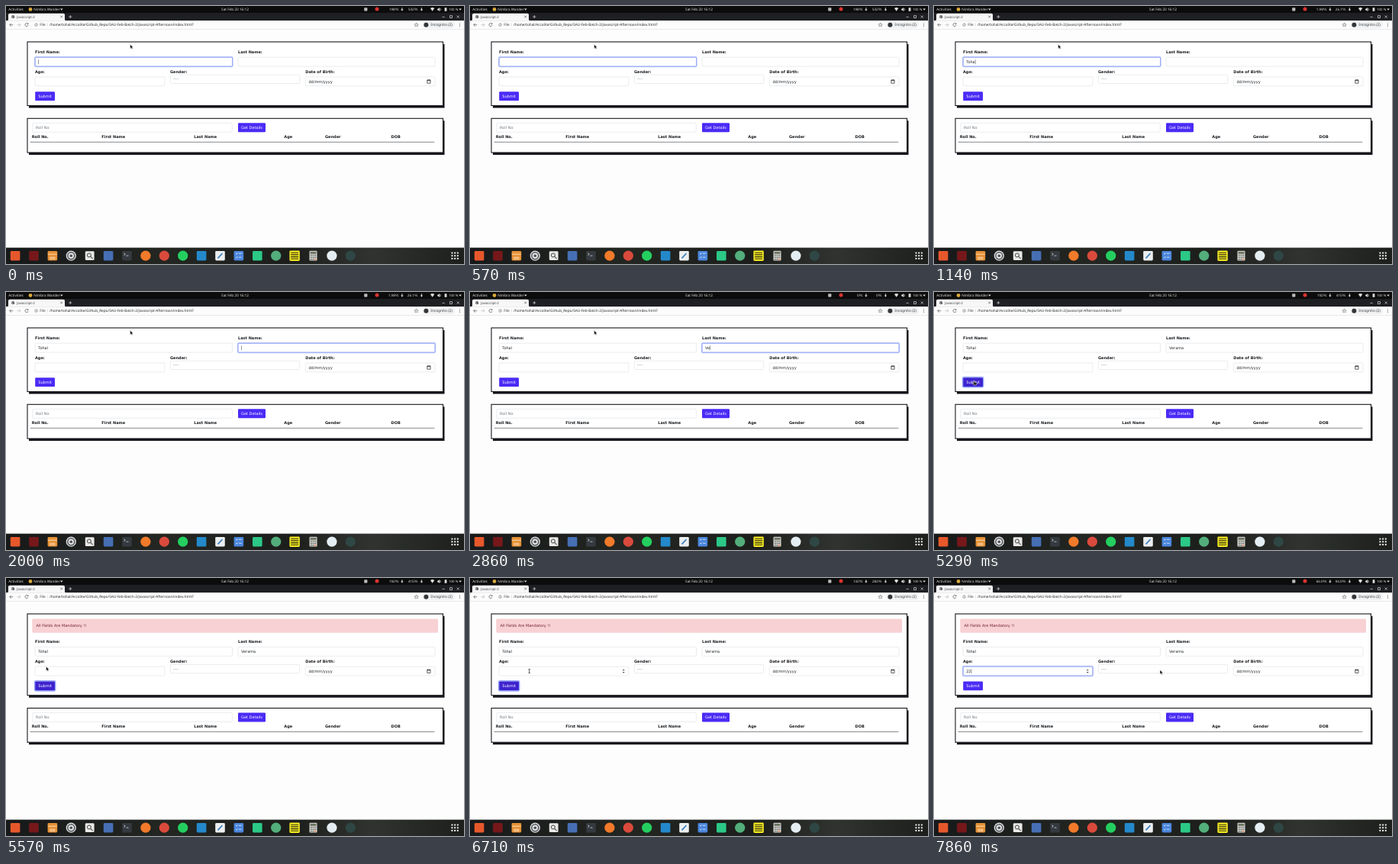
An HTML page that plays this animation: 600 px wide and 338 px high, repeating every 8 s.

```html
<!DOCTYPE html>
<html lang="en">
<head>
<meta charset="utf-8">
<title>Form demo</title>
<style>
html, body { margin: 0; width: 100%; height: 100%; overflow: hidden; background: #fdfdfe; }
svg { display: block; width: 100%; height: 100%; }
text { font: 5px "DejaVu Sans", sans-serif; fill: #24282c; text-rendering: geometricPrecision; white-space: pre; }
.bold { font-weight: bold; fill: #1b1d20; }
.shell { font: 4.7px "Noto Sans", sans-serif; fill: #e4e4e4; }
.dark { fill: #3a3d41; }
.hint { fill: #747b82; }
.white { fill: #fff; }
.right { text-anchor: end; }
.mid { text-anchor: middle; }
.line { fill: none; stroke: #55585c; stroke-width: .7; }
.light { stroke: #ddd; }
.field { fill: #fff; stroke: #d3d8dd; stroke-width: .5; }
.ring { fill: none; stroke: #4664f5; stroke-opacity: .32; stroke-width: 1.5; }
.focus { fill: none; stroke: #869df6; stroke-width: .7; }
</style>
</head>
<body>
<svg id="stage" viewBox="0 0 600 338" preserveAspectRatio="none">
  <defs>
    <linearGradient id="wall">
      <stop offset="0" stop-color="#17191a"/>
      <stop offset=".35" stop-color="#232621"/>
      <stop offset=".62" stop-color="#1c1e1c"/>
      <stop offset=".8" stop-color="#30332f"/>
      <stop offset="1" stop-color="#1d1f1d"/>
    </linearGradient>
  </defs>
  <g id="page"></g>
  <g id="chrome"></g>
  <g id="dock"></g>
  <g id="pointer">
    <path id="arrow" d="M0 0V5.6L1.3 4.4L2.2 6.3L3.2 5.8L2.4 4H4.1Z" fill="#111" stroke="#fff" stroke-width=".45"/>
    <path id="beam" d="M-1.2 -2.6Q0 -2.6 0 -2V2Q0 2.6 -1.2 2.6M1.2 -2.6Q0 -2.6 0 -2M0 2Q0 2.6 1.2 2.6" fill="none" stroke="#111" stroke-width=".7"/>
    <path id="hand" d="M-.6 0Q0 -.7 .6 0V2L3.2 2.6Q3.8 3 3.5 4.4L2.9 6H-.5L-2.3 3.5Q-2 2.7 -.6 3.7Z" fill="#222" stroke="#fff" stroke-width=".5"/>
  </g>
</svg>
<script>
const $ = id => document.getElementById(id);

function add(parent, tag, attrs, content) {
  const el = document.createElementNS('http://www.w3.org/2000/svg', tag);
  for (const key in attrs) el.setAttribute(key, attrs[key]);
  if (content) el.textContent = content;
  return parent.appendChild(el);
}
const rect = (g, x, y, width, height, attrs) => add(g, 'rect', { x, y, width, height, ...attrs });
const circle = (g, cx, cy, r, attrs) => add(g, 'circle', { cx, cy, r, ...attrs });
const path = (g, d, attrs) => add(g, 'path', { d, ...attrs });
const text = (g, x, y, content, cls = '', style = '') => add(g, 'text', { x, y, class: cls, style }, content);
const show = (el, on) => el.setAttribute('visibility', on ? 'visible' : 'hidden');

const INK = '#17181d', BUTTON = '#4a2bf6', PRESSED = '#3d23cf', SHIFT = 23.2;

// Page
const page = $('page');
rect(page, 0, 30, 600, 287, { fill: '#fdfdfe' });

function panel(g, y, height) {
  return [[30, y + 3, INK, 'none'], [28, y, '#fff', INK]].map(([x, top, fill, stroke]) =>
    rect(g, x, top, 544.5, height, { fill, stroke, 'stroke-width': 1.1 }));
}
const formPanel = panel(page, 47, 83.5);
const alertBox = add(page, 'g');
rect(alertBox, 34.3, 53.5, 531.7, 18.2, { rx: 1.2, fill: '#f8d1d5' });
text(alertBox, 39.4, 64.4, 'All Fields Are Mandatory !!', '', 'fill:#752330');

const body = add(page, 'g');
panel(body, 147.3, 44.7);

function field(x, y, width) {
  rect(body, x, y, width, 11.9, { rx: 1.2, class: 'field' });
  const glow = add(body, 'g');
  rect(glow, x - .5, y - .5, width + 1, 12.9, { rx: 1.6, class: 'ring' });
  rect(glow, x, y, width, 11.9, { rx: 1.2, class: 'focus' });
  const value = text(body, x + 4, y + 7.8, '');
  const caret = rect(body, x + 4.2, y + 3, .45, 6, { fill: '#222' });
  return { x, glow, value, caret };
}
const fields = {
  first: field(38.2, 67.2, 258.3),
  last: field(304, 67.2, 258),
  age: field(38.2, 92.9, 169.6),
};
[['First Name:', 38, 62], ['Last Name:', 304, 62], ['Age:', 38, 87.6],
 ['Gender:', 215, 87.6], ['Date of Birth:', 392.3, 87.6],
 ['Roll No.', 33.7, 173.3], ['First Name', 125.3, 173.3], ['Last Name', 246.3, 173.3],
 ['Age', 364.3, 173.3], ['Gender', 418, 173.3], ['DOB', 504.5, 173.3],
].forEach(([label, x, y]) => text(body, x, y, label, 'bold'));

rect(body, 215.3, 90.2, 169.4, 11.3, { rx: 1.2, class: 'field' });
text(body, 219, 97.4, '----', 'hint');
rect(body, 392.3, 92.9, 169.6, 11.9, { rx: 1.2, class: 'field' });
text(body, 396.4, 100.7, 'dd/mm/yyyy');
path(body, 'M551.8 97H556V101.2H551.8ZM551.8 97.7H556M552.8 96.2V97M555 96.2V97', { class: 'line', style: 'stroke:#222' });
const spinner = path(body, 'M199.6 98.1L201.2 96.2L202.8 98.1ZM199.6 99.7L201.2 101.6L202.8 99.7Z', { fill: '#555' });

function button(x, y, width, label) {
  const face = rect(body, x, y, width, 11.9, { rx: 1.2, fill: BUTTON });
  text(body, x + width / 2, y + 7.7, label, 'white mid');
  return face;
}
const submitRing = rect(body, 37.5, 111.5, 27.2, 13.2, { rx: 1.7, class: 'ring', style: 'stroke-opacity:.55' });
const submit = button(38.2, 112.2, 25.8, 'Submit');
rect(body, 34.7, 153.3, 261.6, 11.9, { rx: 1.2, class: 'field' });
text(body, 39, 161.2, 'Roll No', 'hint');
button(304, 153.3, 36, 'Get Details');
path(body, 'M31.5 178.3H561.3', { class: 'line' });

// Desktop bar and browser frame
const top_ = $('chrome');
rect(top_, 0, 0, 600, 9, { fill: '#0c0c0d' });
text(top_, 3.3, 5.9, 'Activities', 'shell');
circle(top_, 32, 4.4, 2.4, { fill: '#d9a93a' });
text(top_, 36.3, 5.9, 'Nimbra Wander', 'shell', 'font-size:4.6px');
path(top_, 'M71 3.6H74.6L72.8 5.7Z M593.3 3.6H596.9L595.1 5.7Z', { fill: '#ddd' });
text(top_, 300, 5.9, 'Sat Feb 20  16:12', 'shell mid', 'white-space:normal');
rect(top_, 469.2, 2.2, 4.2, 4.2, { fill: '#bbb', rx: .6 });
circle(top_, 486, 4, 2.5, { fill: '#d8342e' });
const rates = [514.3, 539.3].map(x => text(top_, x, 5.9, '', 'shell right', 'font-size:4.5px'));
path(top_, 'M517.1 4.4H520.7L518.9 6.6ZM518.4 2.3H519.4V4.6H518.4ZM542.6 4.4H546.2L544.4 6.6ZM543.9 2.3H544.9V4.6H543.9Z', { fill: '#ddd' });
path(top_, 'M555.9 3Q558.6 1 561.3 3L558.6 6.7Z M565.2 3.6H566.4L568.2 2V7L566.4 5.4H565.2Z M574.6 2.2H577.4V6.8H574.6Z', { fill: '#ddd' });
path(top_, 'M569 3Q570 4.5 569 6', { class: 'line light' });
text(top_, 580, 5.9, '100 %', 'shell', 'font-size:4.4px');

rect(top_, 0, 9, 600, 10.3, { fill: '#1e1f22' });
path(top_, 'M1.5 19.3Q3 19 3 17.5V11.5Q3 9.7 5 9.7H75Q77 9.7 77 11.5V17.5Q77 19 78.5 19.3Z', { fill: '#f7f7f8' });
circle(top_, 9.2, 14.2, 2.1, { fill: '#55595e' });
path(top_, 'M7.3 13.5L9 14.2L8.7 16M9.5 12.3L11 13.6', { class: 'line', style: 'stroke:#f7f7f8;stroke-width:.5' });
text(top_, 14, 15.8, 'Javascript-2', 'shell dark', 'font-size:4.4px');
path(top_, 'M71.3 12.7L74 15.4M74 12.7L71.3 15.4', { class: 'line' });
path(top_, 'M82.2 14.1H86.4M84.3 12V16.2M571.5 14.4H574.7M581.5 12.6H584.5V15.6H581.5ZM590.7 12.6L593.7 15.6M593.7 12.6L590.7 15.6', { class: 'line light' });

rect(top_, 0, 19.3, 600, 11, { fill: '#fcfcfc' });
path(top_, 'M0 30.5H600', { class: 'line', style: 'stroke:#d4d5d7;stroke-width:.5' });
path(top_, 'M9.3 24.7H4.8M6.9 22.6L4.8 24.7L6.9 26.8', { class: 'line' });
path(top_, 'M14.5 24.7H19M16.9 22.6L19 24.7L16.9 26.8', { class: 'line', style: 'stroke:#b5b7ba' });
path(top_, 'M28.9 23.4A2.1 2.1 0 1 0 29.1 25.3M29.1 22.3V23.8H27.6', { class: 'line' });
circle(top_, 39.6, 24.6, 1.8, { class: 'line', style: 'stroke-width:.5' });
path(top_, 'M39.6 24.3V25.7M39.6 23.3V23.8', { class: 'line', style: 'stroke-width:.5' });
text(top_, 44.2, 26.3, 'File', 'shell dark');
path(top_, 'M54.3 22.3V27', { class: 'line', style: 'stroke:#ccc;stroke-width:.5' });
text(top_, 57, 26.3, '/home/tohal/Accolite/Github_Repo/SAU-Feb-Batch-2/Javascript-Afternoon/index.html?', 'shell dark', 'fill:#26282b');
path(top_, 'M537.6 22L538.3 23.9H540.3L538.7 25.1L539.3 27L537.6 25.9L535.9 27L536.5 25.1L534.9 23.9H536.9Z', { class: 'line', style: 'stroke-width:.5' });
rect(top_, 545.5, 20.8, 42.5, 8, { rx: 4, fill: '#f0f1f2' });
circle(top_, 550.4, 24.8, 3, { fill: '#333639' });
text(top_, 556.3, 26.4, 'Incognito (2)', 'shell dark', 'font-size:4.8px');
for (const y of [23, 24.8, 26.6]) circle(top_, 594.3, y, .5, { fill: '#444' });

// Dock
const dock = $('dock');
rect(dock, 0, 316.6, 600, 21.4, { fill: 'url(#wall)' });
const slot = i => 12.1 + i * 24.4, MID = 327.2;
const tile = (i, fill, size = 12.6) =>
  rect(dock, slot(i) - size / 2, MID - size / 2, size, size, { rx: 1.4, fill });
const disc = (i, fill, r = 6.6) => circle(dock, slot(i), MID, r, { fill });
const mark = (i, d, stroke, width = .9) =>
  path(dock, d, { transform: `translate(${slot(i)} ${MID})`, fill: 'none', stroke, 'stroke-width': width });

tile(0, '#e6582c');
tile(1, '#76181a');
tile(2, '#e79236'); mark(2, 'M-6 -2H6M-3 2.2H3V4.2H-3Z', '#fbe3c4');
disc(3, '#d9dbdd'); disc(3, '#53575b', 5.2); disc(3, '#e3e4e5', 3.7); disc(3, '#4b4f53', 1.8);
tile(4, '#e9e9e7', 11.8); mark(4, 'M1.6 -.8A2.4 2.4 0 1 1 -3.2 -.8A2.4 2.4 0 1 1 1.6 -.8M1 1L4 4', '#555', 1.1);
tile(5, '#466fb4');
tile(6, '#343a3f'); mark(6, 'M-4.2 -3.6L-2.2 -2L-4.2 -.4M-1 0H2', '#d8d8d8', .8);
disc(7, '#f27a2b');
disc(8, '#d94a3c');
disc(9, '#24cf5f');
tile(10, '#2489ca');
tile(11, '#eceff1'); mark(11, 'M-3 3.2L3 -3.2', '#3b7dbd', 1.7);
tile(12, '#4b86dd'); mark(12, 'M-3.8 -3L-2.8 -2L-1.4 -4M0 -3H4M-3.8 2L-2.8 3L-1.4 1M0 2H4', '#e6effc', .8);
tile(13, '#2cc887');
disc(14, '#53ae7b');
tile(15, '#f7ec22', 13.4); mark(15, 'M-5 -4H5M-5 -1.3H5M-5 1.4H5M-5 4.1H5', '#2b2a12', 1.1);
rect(dock, slot(16) - 5, MID - 6.4, 10, 12.8, { rx: 1, fill: '#d9d8d3' });
rect(dock, slot(16) - 4, MID - 5.3, 8, 2.8, { fill: '#69725f' });
mark(16, 'M-3.7 -.6H-1.7M-1 -.6H1M1.7 -.6H3.7M-3.7 2H-1.7M-1 2H1M1.7 2H3.7M-3.7 4.6H-1.7M-1 4.6H1', '#72736f', 1.5);
mark(16, 'M1.7 4.6H3.7', '#e8743b', 1.5);
disc(17, '#e4edf2');
disc(18, '#2f4744');
for (let i = 0; i < 9; i++)
  rect(dock, 583.4 + i % 3 * 3.7, 322.5 + Math.floor(i / 3) * 3.7, 2, 2, { fill: '#eee' });

// Timeline, in steps of 1/7 s
const FPS = 7, STEPS = 56;
const typed = {
  first: ['Tohal', [5, 6, 7, 8, 9]],
  last: ['Verama', [18, 20, 21, 22, 23, 24]],
  age: ['22', [51, 52]],
};
const focusSteps = [[0, 'first'], [14, 'last'], [26, 'age'], [36, 'submit'], [49, 'age']];
const rateSteps = [
  [0, '198ᴮ⁄s', '532ᴮ⁄s'], [7, '1.98ᴷ⁄s', '26.1ᴷ⁄s'], [15, '0ᴮ⁄s', '0ᴮ⁄s'], [24, '679ᴮ⁄s', '106ᴮ⁄s'],
  [32, '192ᴮ⁄s', '415ᴮ⁄s'], [41, '132ᴮ⁄s', '282ᴮ⁄s'], [50, '66.0ᴮ⁄s', '94.0ᴮ⁄s'],
];
const pointerSteps = [[0, 162.6, 50.3], [31, 162.6, 50.3], [35, 52.5, 116], [40, 52.5, 116], [44, 77.7, 122], [52, 77.7, 122], [55, 296, 120.4]];
const ALERT_STEP = 38;

const latest = (table, step) => table.filter(row => row[0] <= step).pop();

function pointerAt(step) {
  const next = pointerSteps.findIndex(row => row[0] > step);
  if (next < 0) return pointerSteps[pointerSteps.length - 1].slice(1);
  const [s0, x0, y0] = pointerSteps[next - 1], [s1, x1, y1] = pointerSteps[next];
  const p = (step - s0) / (s1 - s0), e = p * p * (3 - 2 * p);
  return [x0 + (x1 - x0) * e, y0 + (y1 - y0) * e];
}

function draw(step) {
  const alerted = step >= ALERT_STEP, dy = alerted ? SHIFT : 0;
  show(alertBox, alerted);
  body.setAttribute('transform', `translate(0 ${dy})`);
  formPanel.forEach(el => el.setAttribute('height', 83.5 + dy));

  const [focusStep, focus] = latest(focusSteps, step);
  for (const name in fields) {
    const { x, glow, value, caret } = fields[name], [word, keys] = typed[name];
    const done = keys.filter(k => k <= step);
    value.textContent = word.slice(0, done.length);
    show(glow, focus === name);
    const since = step - Math.max(focusStep, ...done);
    show(caret, focus === name && since % 7 < 4);
    caret.setAttribute('x', x + 4.2 + value.getComputedTextLength());
  }

  const [px, py] = pointerAt(step), y = py - dy;
  const inside = (x0, y0, x1, y1) => px > x0 && px < x1 && y > y0 && y < y1;
  const overAge = inside(38, 93, 208, 105), overSubmit = inside(38, 112, 64, 124);
  show($('beam'), overAge);
  show($('hand'), overSubmit);
  show($('arrow'), !overAge && !overSubmit);
  $('pointer').setAttribute('transform', `translate(${px} ${py})`);
  show(spinner, overAge || focus === 'age');
  show(submitRing, focus === 'submit');
  submit.setAttribute('fill', overSubmit || focus === 'submit' ? PRESSED : BUTTON);

  const rate = latest(rateSteps, step);
  rates.forEach((el, i) => el.textContent = rate[i + 1]);
}

const start = performance.now();
function tick() {
  const elapsed = performance.now() - start;
  // Steps begin on 10 ms marks, slightly ahead of exact sevenths.
  draw(Math.floor((elapsed + 5) * FPS / 1000) % STEPS);
  requestAnimationFrame(tick);
}
tick();
</script>
</body>
</html>
```
